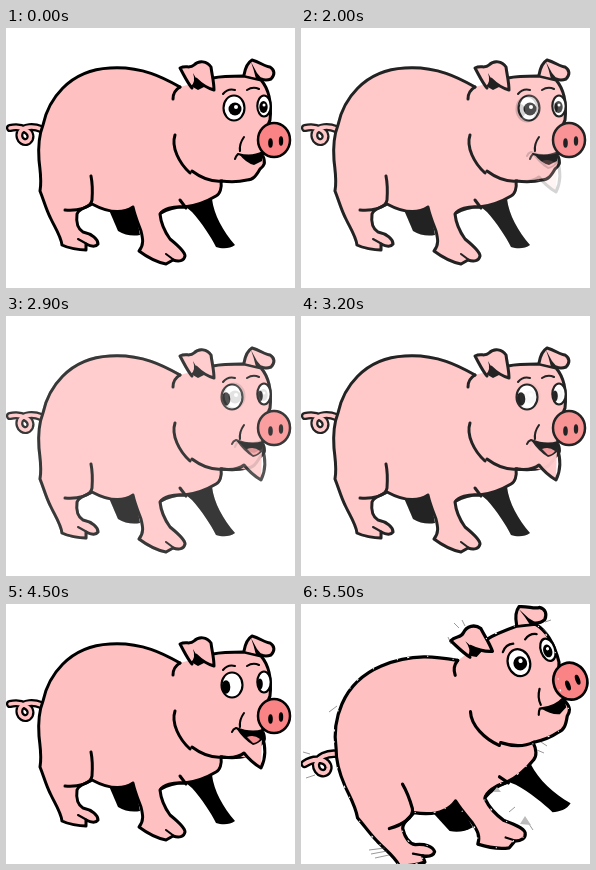
These frames come from a looping animation (289x260 px, 7.5 s). An HTML page:

```html
<!DOCTYPE html>
<html lang="en">
<head>
<meta charset="utf-8">
<title>Pig</title>
<style>
html, body { margin: 0; width: 100%; height: 100%; overflow: hidden; background: #fff; }
svg { display: block; width: 100vw; height: 100vh; }
.ink { fill: none; stroke: #000; stroke-width: 3; stroke-linecap: round; stroke-linejoin: round; }
.skin { fill: #ffc0c1; }
.thin { stroke-width: 2.1; }
.white { fill: #fff; }
.scratch { fill: none; stroke: #555; stroke-width: .6; }

.calm, .laugh, .rear { animation: 7.5s step-end infinite; }
.calm { animation-name: calm; }
.laugh { animation-name: laugh; }
.rear { animation-name: rear; }

/* both poses fade at once, in five equal steps of 300 ms */
@keyframes calm {
  0% { opacity: 1; }
  26.6667% { opacity: .8333; animation-timing-function: steps(5); }
  46.6666% { opacity: 0; }
  46.6667% { opacity: 1; }
  60%, 100% { opacity: 0; }
}
@keyframes laugh {
  0% { opacity: 0; }
  26.6667% { opacity: .1667; animation-timing-function: steps(5); }
  46.6666% { opacity: 1; }
  46.6667% { opacity: 0; }
  60% { opacity: 1; }
  73.3333%, 100% { opacity: 0; }
}
@keyframes rear {
  0% { opacity: 0; }
  73.3333%, 100% { opacity: 1; }
}
</style>
</head>
<body>
<svg viewBox="0 0 289 260" preserveAspectRatio="none">
<defs>
  <path id="outline" d="M207 50C216 48 227 48 238 48L255 52C262 60 266 73 264 92C257 107 256 119 257 128C260 135 258 138 254 141C250 148 247 152 241 152C233 154 223 154 215 153C216 160 214 166 210 168C200 174 188 178 178 179C167 178 157 181 154 186C155 196 159 204 164 211C170 216 179 223 179 228C178 233 173 234 167 232L160 236C150 234 141 229 133 223C138 217 137 211 135 203C132 195 129 188 127 179C115 187 99 183 86 176C82 179 73 180 71 186C70 194 72 201 77 204C86 206 92 211 92 216C89 220 84 218 80 216L80 222C73 222 62 220 56 217C55 208 48 198 44 189C40 181 38 173 34 163C36 152 34 143 33 132C32 118 33 107 37 97C42 73 62 42 104 40C136 38 158 50 174 59"/>
  <path id="curl" d="M35 101C28 98 18 98 14 104C11 112 20 118 24 111C27 104 16 97 4 100"/>

  <g id="body">
    <path d="M103 182L112 203Q122 209 134 207L129 180Z"/>
    <path d="M180 179L206 171C208 187 217 203 229 217C224 221 216 221 210 219C205 209 196 195 186 184Z"/>
    <use href="#curl" class="ink" style="stroke-width:8"/>
    <use href="#curl" class="ink" style="stroke:#ffc0c1;stroke-width:3.6"/>
    <use href="#outline" class="ink" style="fill:#ffc0c1"/>
    <g class="ink">
      <path d="M174 59Q167 63 167 71M169 107C165 119 173 135 184 145M186 143C194 149 205 154 216 153"/>
      <path d="M59 182C72 183 85 180 86 172Q87 158 85 148M155 185Q165 179 178 179M174 172L180 180"/>
      <path class="thin" d="M72 211L81 216M160 226L168 232"/>
    </g>
    <path class="ink" style="fill:#ffc0c1" d="M186 60C181 54 178 47 174 40C180 37 184 41 188 37C193 32 201 33 205 39C206 47 208 54 208 62C201 60 195 56 190 51"/>
    <path d="M187 45L191 52L200 58L192 62L185 58Q190 54 187 45Z"/>
    <path class="ink" style="fill:#ffc0c1" d="M238 47C239 41 241 35 246 32C254 34 259 39 264 39C269 42 269 47 265 51Q260 53 255 51"/>
    <path d="M245 34L251 45L257 52L250 51Q248 42 245 34Z"/>
    <path class="ink thin" d="M217 66Q222 60 229 62M241 62Q247 58 253 61"/>
  </g>

  <ellipse id="farEye" class="ink thin" style="fill:#fff" cx="258" cy="78" rx="6.7" ry="10.5"/>
  <g id="snout">
    <ellipse class="ink" style="fill:#f98385;stroke-width:2.5" cx="268" cy="112" rx="16" ry="17"/>
    <ellipse cx="264.5" cy="115" rx="2.3" ry="4.8"/>
    <ellipse cx="275" cy="113" rx="2.2" ry="4.8"/>
  </g>

  <g id="calmPig">
    <use href="#body"/>
    <ellipse class="ink thin" style="fill:#fff" cx="228" cy="80" rx="10.5" ry="12.5"/>
    <use href="#farEye"/>
    <circle cx="229" cy="81" r="6.5"/><circle class="white" cx="230" cy="79" r="2"/>
    <ellipse cx="257.5" cy="79" rx="4.2" ry="6"/><circle class="white" cx="258" cy="77" r="1.5"/>
    <path class="ink thin" d="M238 109Q233 116 234 123M229 131Q230 128 232 126Q246 130 257 124"/>
    <path d="M233 126Q245 130 257 125L256 133L248 137Q240 135 233 126Z"/>
    <use href="#snout"/>
  </g>

  <g id="laughPig">
    <use href="#body"/>
    <path class="skin" d="M230 130L256 131L255 163L241 154L228 151Z"/>
    <path class="ink" d="M215 153Q231 155 238 149Q245 158 255 164C260 154 260 143 256 131"/>
    <ellipse class="ink thin" style="fill:#fff" cx="226" cy="81" rx="10.5" ry="12.5"/>
    <use href="#farEye"/>
    <ellipse cx="220" cy="83" rx="4.3" ry="6.8"/>
    <ellipse cx="254" cy="80" rx="2.8" ry="5.5"/>
    <path class="ink thin" d="M238 109Q233 116 234 123M226 128Q227 125 230 124Q245 130 257 126"/>
    <path d="M230 124Q245 130 257 126L257 135Q252 140 247 141Q238 136 230 124Z"/>
    <path fill="#f78f92" d="M241 133Q248 130 254 135Q251 139 247 139Z"/>
    <use href="#snout"/>
  </g>
</defs>

<use class="calm" href="#calmPig"/>
<use class="laugh" href="#laughPig"/>

<g class="rear">
  <g transform="matrix(.99 -.36 .37 1.03 -37.4 58.3)">
    <use href="#calmPig"/>
    <use href="#outline" fill="none" stroke="#fff" stroke-dasharray="1 9 2 17 1 23" transform="translate(-.8 -.8)"/>
  </g>
  <path class="scratch" d="M2 148L9 150M5 174L14 171M28 108L36 102M68 246L84 244M70 250L86 247M74 254L88 251M150 40L147 33M158 24L153 19M164 22L161 16M244 18L250 16M242 25L247 30M240 138L246 142M236 146L243 149M208 208L214 203M228 220L232 226"/>
  <path fill="#bbb" d="M196 183L200 188L192 188ZM224 212L230 221L219 220Z"/>
</g>
</svg>
</body>
</html>
```
